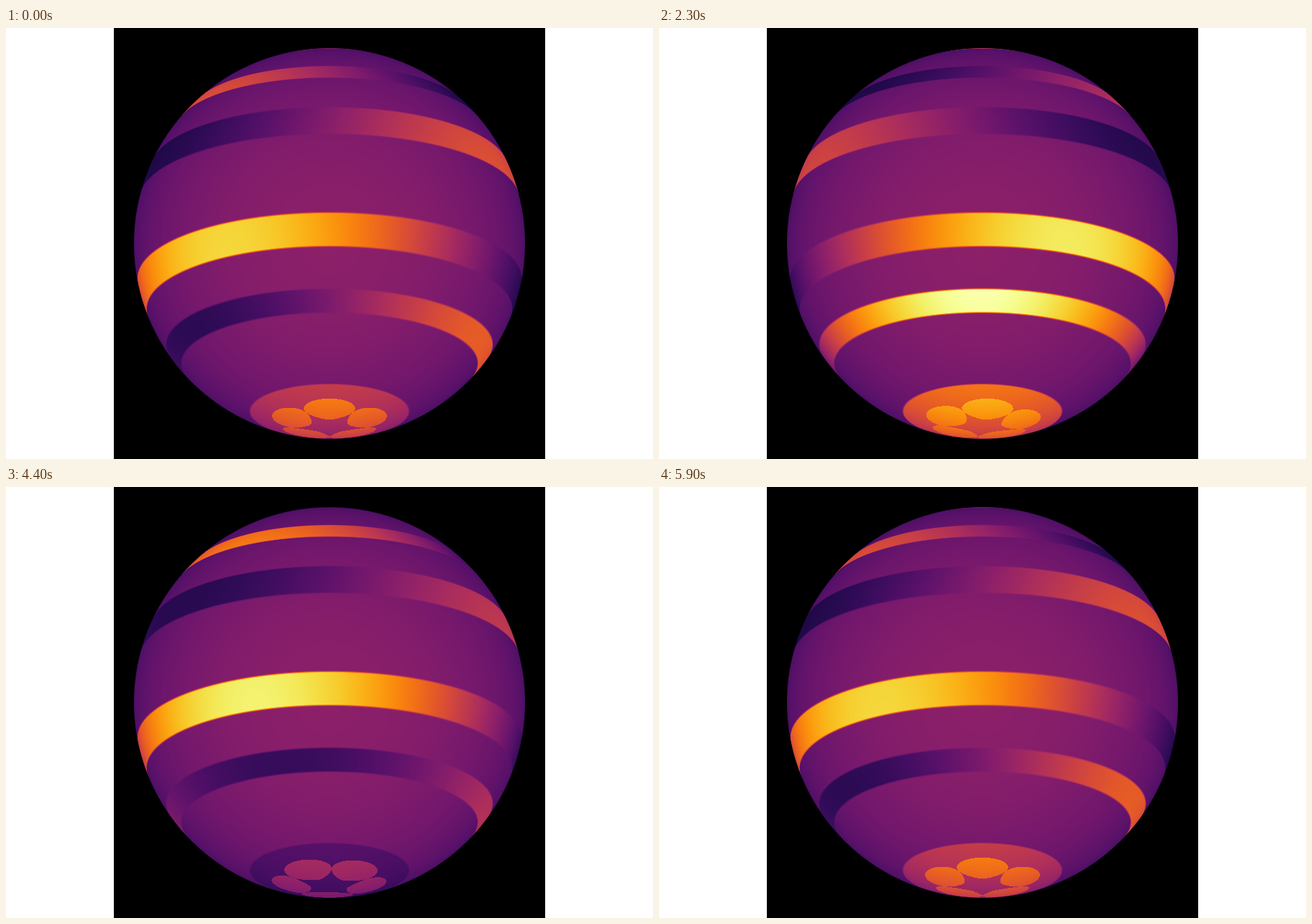
An HTML page with a canvas for the animation above (6 s loop, 900 by 600 pixels).

```html
<!DOCTYPE html>
<html lang="en">
<head>
<meta charset="utf-8">
<title>Banded globe</title>
<style>
  html, body { margin: 0; width: 100%; height: 100%; overflow: hidden; background: #fff; }
  canvas { position: absolute; left: 150px; top: 0; display: block; background: #000; }
</style>
</head>
<body>
<canvas id="globe" width="600" height="600"></canvas>
<script>
const SIZE = 600, RADIUS = 272, LOOP = 6000, STEP = 100, LAST = 59;
const RAD = Math.PI / 180, TILT = 20 * RAD;
const BASE = 0.38, LIMB = 0.43;
const CAP_LAT = 66, SPOT_LAT = 78.4, SPOT_HEIGHT = 5.9, SPOT_WIDTH = 36;

// lat: centre, half: half width, peak: longitude of the crest at the start,
// turns: revolutions of the wave per loop (all in degrees)
const bands = [
  { lat: 41.7, half: 3.57, peak: -100, turns: -24 },
  { lat: 19.2, half: 5.05, peak: 118, turns: -12 },
  { lat: -15.85, half: 4.97, peak: -64, turns: -12 },
  { lat: -37.05, half: 3.65, peak: 127, turns: -24 }
];

const clamp = (v, lo = 0, hi = 1) => Math.min(hi, Math.max(lo, v));

// Inferno colour map as one polynomial per channel
const inferno = [
  [0.00022, 0.10651, 11.60249, -41.704, 77.16294, -71.31943, 25.13113],
  [0.00165, 0.56396, -3.97285, 17.4364, -33.40236, 32.62606, -12.24267],
  [-0.01948, 3.93271, -15.94239, 44.3542, -81.80731, 73.20952, -23.07033]
];
const palette = Array.from({ length: 1024 }, (_, i) =>
  inferno.map(c => 255 * clamp(c.reduceRight((sum, k) => sum * i / 1023 + k, 0))));

const ctx = document.getElementById("globe").getContext("2d");
const image = ctx.createImageData(SIZE, SIZE);
const moving = [];

function paint(at, level, cover) {
  const rgb = palette[Math.round(clamp(level) * 1023)];
  for (let c = 0; c < 3; c++) image.data[at + c] = rgb[c] * cover;
  image.data[at + 3] = 255;
}

function addPixel(px, py) {
  const at = 4 * (py * SIZE + px);
  const x = (px + 0.5 - SIZE / 2) / RADIUS;
  const y = (SIZE / 2 - py - 0.5) / RADIUS;
  const r = Math.hypot(x, y);
  const cover = clamp((1 - r) * RADIUS + 0.5);
  const z = Math.sqrt(Math.max(0, 1 - r * r));
  const light = BASE * (1 - LIMB * (1 - z));
  paint(at, light, cover);
  if (!cover) return;

  const lat = Math.asin(clamp(y * Math.cos(TILT) - z * Math.sin(TILT), -1, 1)) / RAD;
  const lon = Math.atan2(x, y * Math.sin(TILT) + z * Math.cos(TILT)) / RAD;
  const pixel = { at, cover, light, lat, lon };
  const soft = distance => clamp(distance / 0.6 + 0.5);

  const cap = soft(Math.abs(lat) - CAP_LAT);
  if (cap) {
    const dy = (Math.abs(lat) - SPOT_LAT) / SPOT_HEIGHT;
    const reach = SPOT_WIDTH * Math.sqrt(Math.max(0, 1 - dy * dy));
    moving.push({ ...pixel, weight: cap, reach });
  }
  for (const band of bands) {
    const weight = soft(band.half - Math.abs(lat - band.lat));
    if (weight) moving.push({ ...pixel, weight, band });
  }
}

for (let y = 0; y < SIZE; y++)
  for (let x = 0; x < SIZE; x++) addPixel(x, y);

const bandLevel = (p, turn) =>
  1.58 + 1.1 * Math.cos((p.lon - p.band.peak - 360 * p.band.turns * turn) * RAD);

function capLevel(p, turn) {
  const cap = 1.6 + 0.84 * Math.sin(2 * Math.PI * turn);
  const lon = p.lon + 720 * turn;
  const offset = Math.abs(lon - 72 * Math.round(lon / 72));
  return offset < p.reach ? Math.min(cap + 0.67, 2.62) : cap;
}

function draw(turn) {
  for (const p of moving) {
    const level = p.band ? bandLevel(p, turn) : capLevel(p, turn);
    paint(p.at, p.light * (1 + p.weight * (level - 1)), p.cover);
  }
  ctx.putImageData(image, 0, 0);
}

let shown = -1;
function tick() {
  const step = Math.floor(performance.now() % LOOP / STEP);
  if (step !== shown) draw((shown = step) / LAST);
  requestAnimationFrame(tick);
}
tick();
</script>
</body>
</html>
```
